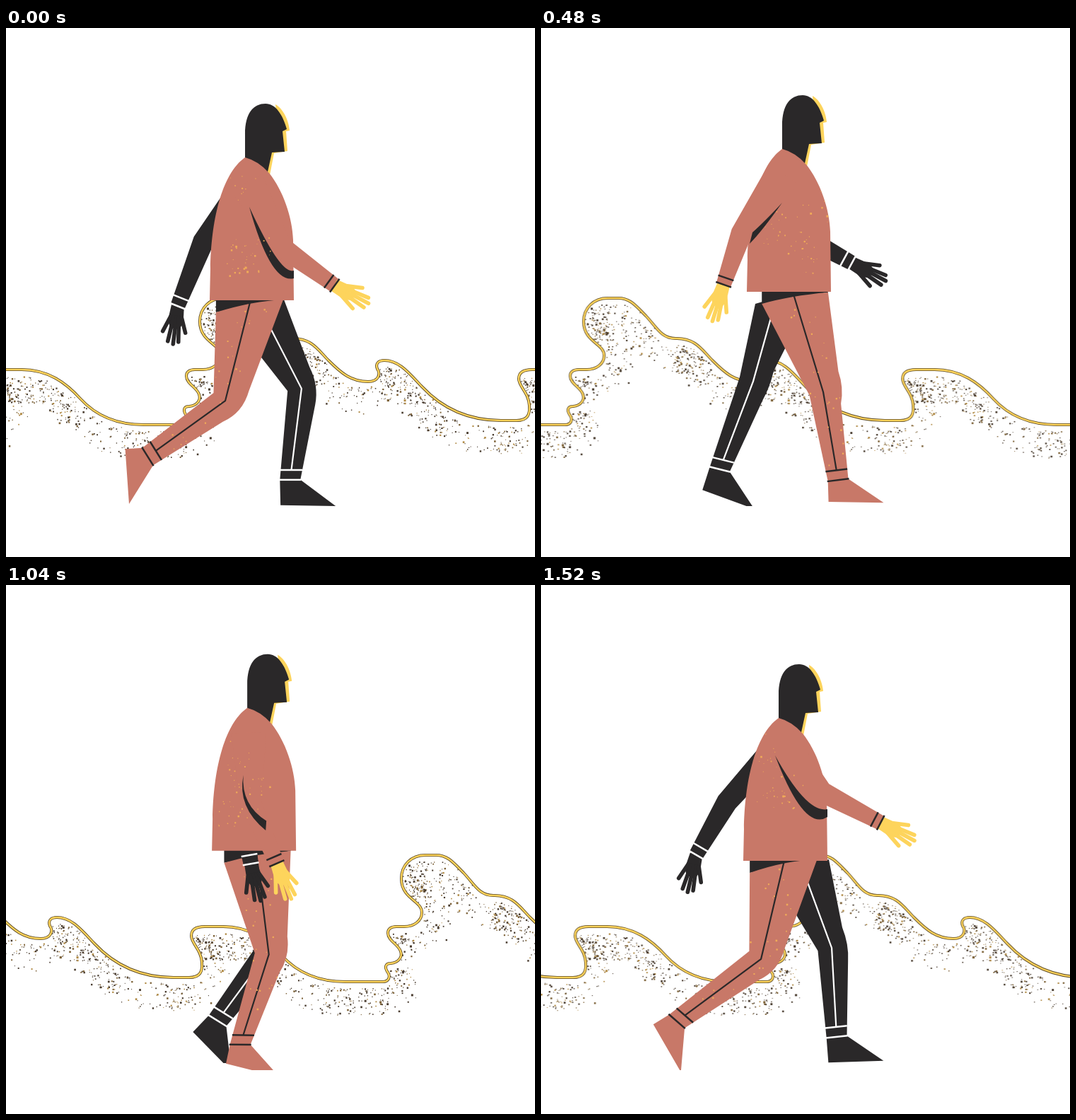
Write an HTML page with a canvas that moves like this. It is 748x748 px and loops after 1600 ms.

```html
<!DOCTYPE html>
<html lang="en">
<head>
<meta charset="utf-8">
<title>Walk</title>
<style>
  html, body { margin: 0; width: 100%; height: 100%; overflow: hidden; background: #fff; }
  canvas { display: block; }
</style>
</head>
<body>
<canvas id="stage" width="748" height="748"></canvas>
<script>
const SIZE = 748, STEP = 80, STEPS = 20, CYCLE = 21;
const INK = '#2a2829', CORAL = '#c87868', YELLOW = '#fdd45c', WHITE = '#fff';
const ctx = document.getElementById('stage').getContext('2d');

// Poses are keyed at these steps of the walk cycle.
const TIMES = [0, 2, 6, 9, 11, 15, 19];
const SWAY = [[0], [0], [3], [5], [4], [2], [-2]];
const BOB_TIMES = [0, 2, 4.5, 6, 9];
const BOB = [[0], [-7], [-18], [-12], [7]];

// hip shift, thigh angle, thigh length, shin angle, shin length, cuff angle, foot angle
const NEAR_LEG = [
  [0, -14.1, 160, -54.3, 135, 58, 86],
  [0, 4.6, 160, -57.9, 136, 53, 84],
  [0, 16.9, 162, 9.6, 126, -7, 1],
  [0, 24.9, 152, 13.5, 133, -11, -4.5],
  [0, 22.3, 158, -12.5, 138, -3, 1],
  [0, -7.4, 162, -22, 131, 7, 29],
  [0, -13.3, 156, -53.5, 148, 41, 60]
];
const FAR_LEG = [
  [-2, 27.2, 155, -7.1, 130, 0, 1],
  [-4, 13.9, 154, -15.5, 131, 3, 0],
  [-13, -15.6, 145, -20.8, 133, 14, 20],
  [-14, -18.9, 130, -42.2, 144, 35, 36],
  [-6, 0, 149, -61.9, 136, 55, 82],
  [4, 15, 151, -8.4, 123, 6, 4],
  [14, 20.2, 145, 3.2, 126, -6, -2]
];
// upper angle, upper length, forearm angle, forearm length, hand angle
const NEAR_ARM = [
  [28.5, 105, 54.2, 92, 61],
  [9.4, 110, 20, 90, 5],
  [-35.2, 104, -19.1, 76, -18],
  [-47.9, 98, -29.8, 86, -23],
  [-20.5, 97, -10, 92, -14],
  [20.6, 103, 52, 91, 53],
  [40.6, 92, 62.3, 93, 61]
];
const FAR_ARM = [
  [-36, 104, -21.6, 98, -8],
  [10.9, 106, 15.5, 93, -3],
  [18, 94, 61.4, 77, 61],
  [23, 78, 74.7, 87, 72],
  [15, 92, 35.8, 89, 39],
  [-27.6, 104, -10.4, 88, -5],
  [-41.8, 113, -30.2, 86, -14]
];
// Shade under the near arm: tip, inner bend, inner end, outer end, outer bend
const SHADE = [
  [344, 253, 382, 324, 407, 343, 407, 354, 375, 333],
  [332, 262, 347, 332, 379, 405, 377, 419, 337, 337],
  [338, 259, 315, 283, 296, 301, 292, 317, 312, 294],
  [339, 255, 317, 270, 296, 283, 294, 299, 313, 282],
  [333, 294, 323, 307, 317, 317, 315, 332, 324, 313],
  [333, 255, 355, 315, 406, 356, 406, 368, 348, 321],
  [333, 236, 374, 296, 407, 312, 407, 323, 372, 312]
];

const HILL = `M0 483 L22 483 C60 483 85 502 105 524 C125 546 155 561 195 561 L248 561
  C256 561 259 554 255 548 C250 541 251 535 259 535 C270 534 276 526 273 518
  C270 508 255 503 255 492 C255 486 260 483 267 483 L278 483
  C292 483 303 475 303 463 C303 446 274 444 274 415 C274 396 288 382 308 382 L323 382
  C340 382 348 393 362 407 C378 424 384 439 404 439 C432 438 442 456 456 470
  C474 488 488 500 512 500 C527 500 530 489 525 482 C522 474 527 470 535 470
  C556 470 570 488 588 507 C615 536 650 555 700 555 L722 555
  C738 555 741 546 740 534 C739 515 725 507 725 496 C725 487 732 483 744 483 L748 483`;
const TORSO = new Path2D(`M338 183 Q357 188 372 205 C392 230 405 268 406 300
  L407 385 L288 385 L289 340 C290 275 304 207 338 183Z`);
const HEAD = new Path2D(`M338 186 L338 150 C338 120 350 107 367 107
  C381 107 391 122 397 143 L391 146 L394 175 L376 176 L369 208 Z`);
const FACE = new Path2D(`M381 108 C392 114 400 131 401 145 L396 146
  L398 174 L379 177 L373 208 L366 206 L384 140 Z`);

function random(seed) {
  let s = seed * 7919 + 17;
  return () => {
    s = (Math.imul(s, 1664525) + 1013904223) >>> 0;
    return s / 4294967296;
  };
}

// Periodic cubic through the keyed rows.
function spline(times, rows, k, period) {
  const n = times.length;
  const t = j => times[(j + n) % n] + period * Math.floor(j / n);
  const r = j => rows[(j + n) % n];
  let i = n - 1;
  while (times[i] > k) i--;
  const h = t(i + 1) - t(i), u = (k - t(i)) / h, v = 1 - u;
  return r(i).map((a, c) => {
    const b = r(i + 1)[c];
    const ma = (b - r(i - 1)[c]) / (t(i + 1) - t(i - 1)) * h;
    const mb = (r(i + 2)[c] - a) / (t(i + 2) - t(i)) * h;
    return v * v * (1 + 2 * u) * a + u * u * (3 - 2 * u) * b + u * v * (v * ma - u * mb);
  });
}

// Step from p along a limb: angle 0 points down, side is forward of the limb.
function at([x, y], deg, along, side = 0) {
  const a = deg * Math.PI / 180, s = Math.sin(a), c = Math.cos(a);
  return [x + s * along + c * side, y + c * along - s * side];
}

function line(points, color, width) {
  ctx.beginPath();
  points.forEach(p => ctx.lineTo(...p));
  ctx.strokeStyle = color;
  ctx.lineWidth = width;
  ctx.stroke();
}

function fill(points, color) {
  ctx.beginPath();
  points.forEach(p => ctx.lineTo(...p));
  ctx.fillStyle = color;
  ctx.fill();
}

function dot(g, x, y, size, color) {
  g.fillStyle = color;
  g.fillRect(x, y, size, size);
}

function makeHills() {
  const tile = document.createElement('canvas');
  tile.width = tile.height = SIZE;
  const g = tile.getContext('2d');
  const curve = document.createElementNS('http://www.w3.org/2000/svg', 'path');
  curve.setAttribute('d', HILL);
  const total = curve.getTotalLength();
  const ground = new Path2D(HILL + 'V748 H0Z');
  const rnd = random(5);
  for (let i = 0; i < 2300; i++) {
    const at = rnd() * total;
    const p = curve.getPointAtLength(at), q = curve.getPointAtLength(Math.min(at + 1, total));
    const far = 9 + 38 * Math.pow(rnd(), 1.3);
    const clump = 0.6 + 0.4 * Math.sin(at / 19) * Math.sin(at / 43 + 1);
    const x = (p.x - (q.y - p.y) * far * 0.7 + (rnd() - 0.5) * 22 + SIZE) % SIZE;
    const y = p.y + (q.x - p.x) * far * 0.7 + far * 0.3;
    const size = 1 + rnd() * rnd() * 2.2, tone = rnd(), keep = rnd() < clump;
    if (!keep || !g.isPointInPath(ground, x, y)) continue;
    dot(g, x, y, size, tone < 0.6 ? '#4a3d30' : tone < 0.85 ? '#7d6238' : '#b08a45');
  }
  const path = new Path2D(HILL);
  for (const [color, width] of [['#57451f', 4], [YELLOW, 2.4]]) {
    g.strokeStyle = color;
    g.lineWidth = width;
    g.stroke(path);
  }
  return tile;
}

function leg(body, row, look) {
  const [shift, thigh, thighLen, shin, shinLen, cuff, foot] = row;
  const hip = [349 + body.x + shift, 372 + body.y];
  const knee = at(hip, thigh, thighLen), ankle = at(knee, shin, shinLen);
  const bend = (thigh + shin) / 2;
  const rear = [hip[0] + look.rear + look.turn * 0.4 * thigh, hip[1] + 30];
  const front = [hip[0] + look.front + look.turn * 0.35 * thigh, hip[1] + 12 - body.y * 0.15];
  const top = hip[1] + 5;

  if (look.turn) fill([rear, [rear[0], top], [front[0], top], front], INK);

  ctx.save();
  ctx.beginPath();
  ctx.rect(0, 0, SIZE, look.ground);
  ctx.clip();
  const shape = new Path2D();
  shape.moveTo(...rear);
  shape.quadraticCurveTo(hip[0], hip[1] + 14 - body.y * 0.4, ...front);
  shape.lineTo(...at(knee, thigh, -22, look.knee));
  shape.quadraticCurveTo(...at(knee, bend, 0, look.knee + 1), ...at(knee, shin, 20, 22));
  shape.lineTo(...at(ankle, -cuff, 0, 14.5));
  shape.lineTo(...at(ankle, -foot, look.heel, 65));
  shape.lineTo(...at(ankle, -foot, look.heel, -13));
  shape.lineTo(...at(ankle, -cuff, 0, -14.5));
  shape.lineTo(...at(knee, bend, 0, -20));
  shape.closePath();
  ctx.fillStyle = look.color;
  ctx.fill(shape);

  const band = at(ankle, shin, -14);
  line([hip, knee, band], look.trim, 2.2);
  for (const p of [ankle, band]) {
    line([at(p, -cuff, 0, -15.5), at(p, -cuff, 0, 15.5)], look.trim, 2.5);
  }
  if (look.turn) {
    ctx.clip(shape);
    const rnd = random(body.k + 60);
    for (let i = 0; i < 26; i++) {
      const side = (rnd() - 0.5) * 50;
      const p = i % 3 ? at(hip, thigh, 20 + rnd() * thighLen, side) : at(knee, shin, rnd() * 110, side);
      dot(ctx, ...p, 1 + rnd() * 1.6, '#f0ab58');
    }
  }
  ctx.restore();
}

function hand(wrist, angle, color) {
  const p = (x, y) => at(wrist, angle, y, x);
  fill([p(-9, -1), p(-11, 22), p(-6, 32), p(7, 32), p(11, 22), p(9, -1)], color);
  ctx.lineCap = 'round';
  for (const [x, y] of [[-16, 38], [-7, 51], [1, 54], [8, 50], [16, 36]]) {
    line([p(x * 0.5, 16), p(x, y)], color, 5.6);
  }
  ctx.lineCap = 'butt';
}

function arm(body, row, look, shade) {
  const [upper, upperLen, fore, foreLen, palm] = row;
  const shoulder = [340 + body.x, 218 + body.y];
  const elbow = at(shoulder, upper, upperLen), wrist = at(elbow, fore, foreLen);
  const bend = (upper + fore) / 2;
  fill([
    at(shoulder, upper, 0, -look.width), at(elbow, bend, 0, -15), at(wrist, fore, 0, -10.5),
    at(wrist, fore, 0, 10.5), at(elbow, bend, 0, 15), at(shoulder, upper, 0, look.width)
  ], look.color);
  if (shade) drawShade(body, shade);
  hand(wrist, palm, look.hand);
  for (const d of [0, -look.gap]) {
    const p = at(wrist, fore, d);
    line([at(p, fore, 0, -11.5), at(p, fore, 0, 11.5)], look.trim, 2.5);
  }
}

function drawShade(body, s) {
  const p = i => [s[2 * i] + body.x, s[2 * i + 1] + body.y];
  const through = (a, m, b) =>
    ctx.quadraticCurveTo(...m.map((v, i) => 2 * v - (a[i] + b[i]) / 2), ...b);
  ctx.beginPath();
  ctx.moveTo(...p(0));
  through(p(0), p(1), p(2));
  ctx.lineTo(...p(3));
  through(p(3), p(4), p(0));
  ctx.fillStyle = INK;
  ctx.fill();
}

function trunk(body) {
  ctx.save();
  ctx.translate(body.x, body.y);
  for (const [path, color] of [[FACE, YELLOW], [HEAD, INK], [TORSO, CORAL]]) {
    ctx.fillStyle = color;
    ctx.fill(path);
  }
  ctx.restore();
}

function sprinkle(body) {
  const rnd = random(body.k + 1);
  ctx.save();
  ctx.translate(body.x, body.y);
  ctx.clip(TORSO);
  for (let c = 0; c < 4; c++) {
    const x = 305 + rnd() * 80, y = 215 + rnd() * 150;
    for (let i = 0; i < 12; i++) {
      dot(ctx, x + (rnd() - 0.5) * 50, y + (rnd() - 0.5) * 50, 0.8 + rnd() * rnd() * 2.4, '#f0ab58');
    }
  }
  ctx.restore();
}

const LOOKS = {
  nearLeg: { color: CORAL, trim: INK, rear: -46.5, front: 48, turn: 1, knee: 29, heel: 31, ground: 686 },
  farLeg: { color: INK, trim: WHITE, rear: -36, front: 46, turn: 0, knee: 24, heel: 36, ground: 676 },
  nearArm: { color: CORAL, trim: INK, hand: YELLOW, width: 25, gap: 10 },
  farArm: { color: INK, trim: WHITE, hand: INK, width: 18, gap: 12.5 }
};
const hills = makeHills();

function draw(k) {
  const pose = rows => spline(TIMES, rows, k, CYCLE);
  const half = CYCLE / 2;
  const body = { k, x: pose(SWAY)[0], y: spline(BOB_TIMES, BOB, k % half, half)[0] };

  ctx.fillStyle = WHITE;
  ctx.fillRect(0, 0, SIZE, SIZE);
  const scroll = SIZE * k / CYCLE;
  ctx.drawImage(hills, -scroll, 0);
  ctx.drawImage(hills, SIZE - scroll, 0);

  leg(body, pose(FAR_LEG), LOOKS.farLeg);
  leg(body, pose(NEAR_LEG), LOOKS.nearLeg);
  arm(body, pose(FAR_ARM), LOOKS.farArm);
  trunk(body);
  arm(body, pose(NEAR_ARM), LOOKS.nearArm, pose(SHADE));
  sprinkle(body);
}

let shown = -1;
function tick() {
  const k = Math.floor(performance.now() / STEP) % STEPS;
  if (k !== shown) draw(shown = k);
  requestAnimationFrame(tick);
}
tick();
</script>
</body>
</html>
```
